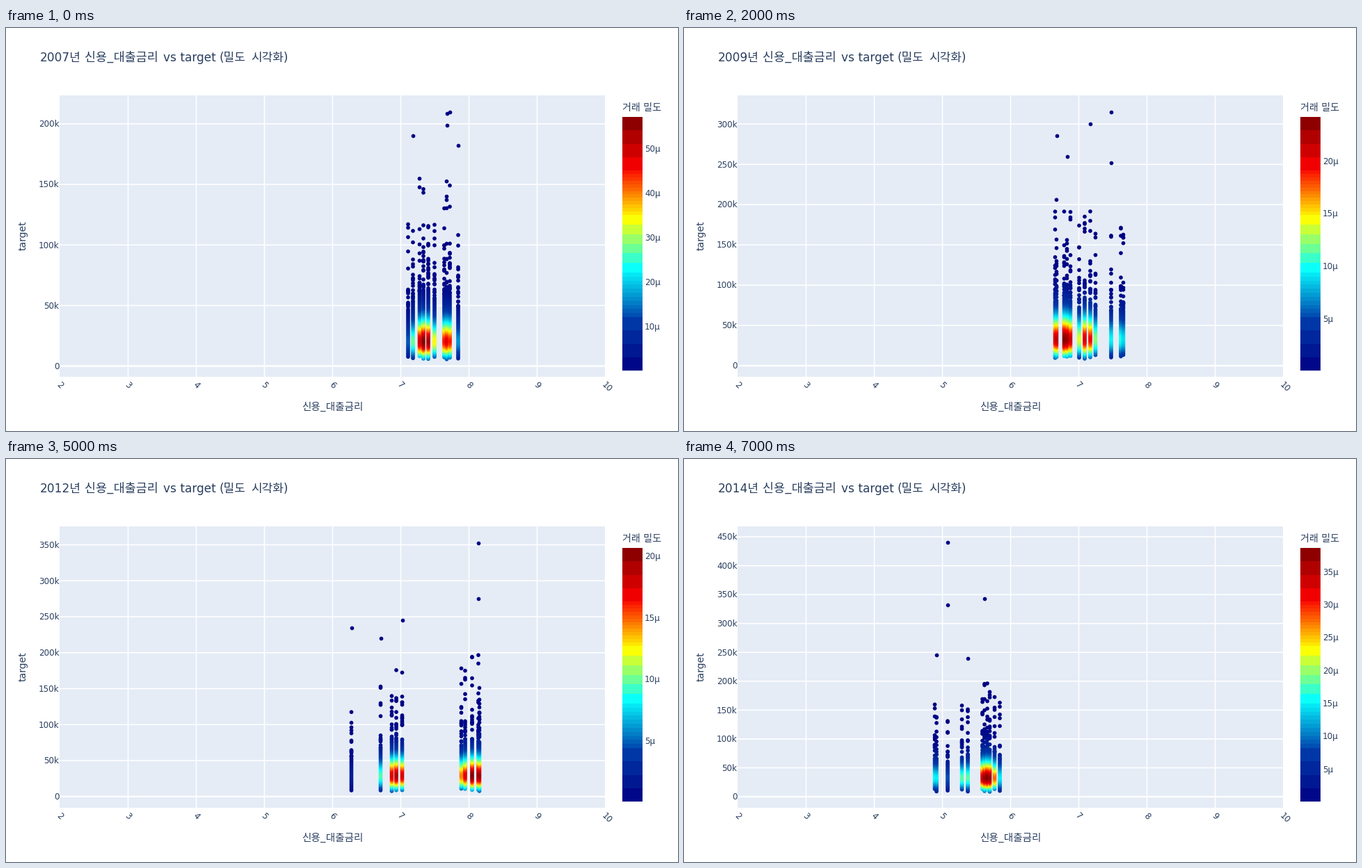
Write a matplotlib script that moves like this. It is 966 px wide and 580 px high and loops after 8 s.

```python
import numpy as np
import matplotlib.pyplot as plt
from matplotlib.animation import FuncAnimation
from matplotlib.colors import LinearSegmentedColormap
from matplotlib.patches import Rectangle

W, H, DPI = 966, 580, 100
PX = 72 / DPI
INK = "#2a3f5f"
LEFT, RIGHT, TOP, BOTTOM = 77, 861, 97, 502
BAR_TOP, BAR_BOTTOM, BAR_ZERO = 128, 493, 494
DOT = 5.7

plt.rcParams["font.family"] = ["DejaVu Sans", "Noto Sans CJK JP"]
JET = LinearSegmentedColormap.from_list("jet6", [
    "#000083", "#003caa", "#05ffff", "#ffff00", "#fa0000", "#800000"])

# The bar has coarse bands at both ends and finer ones between
EDGES = np.concatenate([
    np.linspace(128, 205, 4, endpoint=False),
    np.linspace(205, 269, 13, endpoint=False),
    np.linspace(269, 352, 6, endpoint=False),
    np.linspace(352, 416, 11, endpoint=False),
    np.linspace(416, 493, 5)])

YEARS = []


def add_year(year, zero, scale, mode, crowd, bar, xs, humps, tall):
    """One chart.

    zero, scale: pixel row of 0 and pixels per thousand
    mode, crowd: densest value and top of the packed part, in thousands
    bar:         pixels per colour bar unit and tick step
    xs:          pixel columns of the dots
    humps:       (centre, height, width) of density across the columns
    tall:        (column, value) of the highest lone dots
    """
    YEARS.append((year, zero, scale, mode, crowd, bar, xs, humps, tall))


add_year(2007, 486.5, 1.7425, 21, 60, (6.4, 10),
         [578, 585, 594.5, 600, 607, 616, 630, 633.5, 638, 650],
         [(602, 1, 14), (634, .84, 11)],
         [(638, 210), (633.5, 208.5), (633.5, 199), (585, 190), (650, 182)])

add_year(2008, 480, 1.2, 29, 72, (8.357, 5),
         [640.5, 645, 677.5, 682, 691, 699, 714.5, 739.5, 760, 780.5, 782.5],
         [(643, .72, 8), (683, 1, 11)],
         [(640.5, 299.5), (699, 290), (645, 240), (682, 240), (780.5, 215)])

add_year(2009, 486, 1.159, 34, 80, (15.13, 5),
         [533.5, 535.5, 546.5, 550.5, 555.5, 568, 576, 584, 591.5, 614,
          628, 631.5],
         [(545, 1, 20), (579, .88, 12), (622, .45, 15)],
         [(614, 315), (584, 300), (535.5, 286), (550.5, 260), (614, 252)])

add_year(2010, 483, .8138, 33, 100, (9.82, 5),
         [495.5, 568, 573, 577, 588.5, 601, 607, 629.5],
         [(581, .75, 14), (603, 1, 15)],
         [(573, 445), (601, 328), (577, 290), (629.5, 257.5), (495.5, 250)])

add_year(2011, 482, .85, 32, 84, (12.4, 5),
         np.linspace(577, 661, 9),
         [(602, 1, 22)],
         [(608.5, 405), (619, 300), (587.5, 260)])

add_year(2012, 485.8, 1.035, 30, 74, (17.7, 5),
         [496.5, 538.5, 554.5, 561, 569.5, 654.5, 660, 670, 679, 680.5],
         [(562, .92, 20), (673, 1, 22)],
         [(679, 352.5), (679, 275), (569.5, 245), (496.5, 235), (538.5, 220)])

add_year(2013, 486, .86, 33, 78, (11.2, 5),
         np.linspace(411, 503, 10),
         [(442, 1, 22)],
         [(452, 425), (441.7, 330), (492.8, 265)])

add_year(2014, 486, .831, 34, 77, (9.48, 5),
         [360.5, 363, 379, 399.5, 408, 429, 432, 436, 439.5, 446.5, 454],
         [(361, .4, 8), (404, .48, 20), (436, 1, 13)],
         [(379, 440), (432, 343), (379, 332), (363, 245), (408, 240)])

fig = plt.figure(figsize=(W / DPI, H / DPI), dpi=DPI, facecolor="white")
ax = fig.add_axes([0, 0, 1, 1])


def label(x, y, text, size=12, **kw):
    kw.setdefault("va", "baseline")
    ax.text(x, y, text, fontsize=size * PX, color=INK, **kw)


def box(x, y, w, h, color):
    ax.add_patch(Rectangle((x, y), w, h, fc=color, lw=0, antialiased=False))


def rule(xs, ys, width=1.6):
    ax.plot(xs, ys, color="white", lw=width * PX, solid_capstyle="butt",
            snap=False, zorder=1.5)


def draw_axes(year, zero, scale):
    box(LEFT, TOP, RIGHT - LEFT, BOTTOM - TOP, "#e5ecf6")
    for n in range(2, 11):
        x = LEFT + 0.5 + 98 * (n - 2)
        if 2 < n < 10:
            rule([x, x], [TOP, BOTTOM])
        label(x - 2, 510, str(n), rotation=-45, rotation_mode="anchor",
              va="center_baseline")
    for k in range(0, int((zero - TOP) / scale) + 1, 50):
        y = zero - k * scale
        rule([LEFT, RIGHT], [y, y], 1.6 if k else 2.4)
        label(76.5, y + 4.3, f"{k}k" if k else "0", ha="right")


def draw_titles(year):
    rate, korean = "신용_대출금리", "Noto Sans CJK JP"
    label(48.5, 48, f"{year}년", 17)
    label(113, 48, rate, 17.4, family=korean)
    label(226.5, 48, "vs target", 17)
    label(307, 48, "(밀도", 17)
    label(352.5, 48, "시각화)", 17)
    label(469, 550, rate, 14.5, family=korean, ha="center")
    label(25, 299, "target", 14, rotation=90, ha="center", va="center")


def draw_bar(unit, step):
    label(886, 119.5, "거래 밀도", 14)
    span = BAR_BOTTOM - BAR_TOP
    for a, b in zip(EDGES[:-1], EDGES[1:]):
        box(886, a, 29, b - a, JET((BAR_BOTTOM - (a + b) / 2) / span))
    for n in range(step, int((BAR_ZERO - BAR_TOP) / unit) + 1, step):
        label(918, BAR_ZERO - n * unit + 4.3, f"{n}µ")


def peak_at(x, humps):
    return max([0.1] + [h * np.exp(-((x - c) / w) ** 2 / 2)
                        for c, h, w in humps])


def density(k, mode):
    """Bell below the mode, longer logarithmic slope above it."""
    below = np.exp(-((k - mode) / (0.46 * mode)) ** 2 / 2)
    above = np.exp(-(np.log(k / mode) / 0.46) ** 2 / 2)
    return np.where(k < mode, below, above)


def column_values(peak, mode, crowd, scale, rng):
    """Packed dots, then a thinning tail, then a few lone ones."""
    base = mode * rng.uniform(0.25, 0.4)
    top = crowd * (0.72 + 0.35 * peak)
    end = 1.5 * top
    packed = np.arange(base, top, 2.2 / scale)
    count = int((end - top) * scale / 3.5)
    thin = top + (end - top) * rng.random(count) ** 1.4
    lone = end * (1 + 0.7 * rng.random(5) ** 1.4)
    return np.concatenate([packed, thin, lone])


def draw_dots(xs, k, zero, scale, colors):
    ax.scatter(np.broadcast_to(xs, np.shape(k)), zero - np.asarray(k) * scale,
               s=(DOT * PX) ** 2, c=colors, linewidths=0, zorder=3)


def draw(i):
    year, zero, scale, mode, crowd, bar, xs, humps, tall = YEARS[i]
    rng = np.random.default_rng(year)
    ax.clear()
    ax.set(xlim=(0, W), ylim=(H, 0))
    ax.axis("off")
    draw_axes(year, zero, scale)
    draw_titles(year)
    draw_bar(*bar)
    for x in xs:
        peak = peak_at(x, humps)
        k = column_values(peak, mode, crowd, scale, rng)
        draw_dots(x, k, zero, scale, JET(peak * density(k, mode)))
    draw_dots(*zip(*tall), zero, scale, [JET(0.0)])


anim = FuncAnimation(fig, draw, frames=len(YEARS), interval=1000, repeat=True)
plt.show()
```
